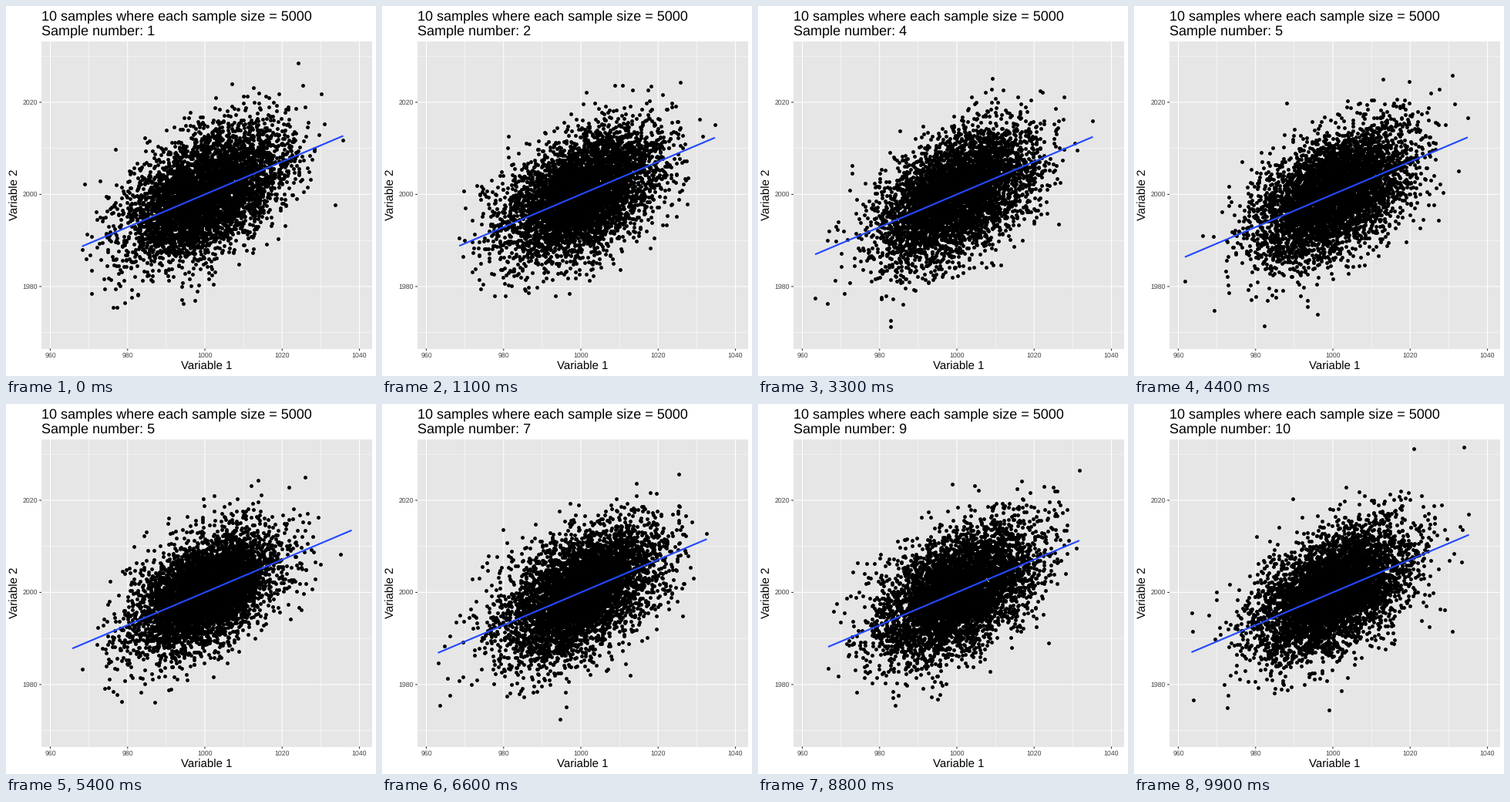
A matplotlib script that plays this animation: 480x480 px, repeating every 10 s.

```python
import numpy as np
import matplotlib.pyplot as plt
from matplotlib.animation import FuncAnimation
from matplotlib.patches import Rectangle

plt.rcParams.update({"font.family": "Liberation Sans", "text.hinting": "none"})

SIZE, DPI = 480, 80
PT = 72 / DPI                        # points per stage pixel
FRAMES, STEPS, N = 100, 11, 5000     # loop length, frames per sample, points
MX, MY, SDX, SDY, CORR = 1000, 2000, 10, 7.1, .5
LEFT, TOP, RIGHT, BOTTOM = 46, 46, 474.5, 444.5
BLUE, PANEL, TICK, TICK_TEXT = "#2449ff", "#e6e6e6", "#333333", "#444444"

# Smallest and largest x of each sample, relative to the mean
LOWS = -31.8, -31.5, -37.5, -36.7, -38.3, -33.9, -37.0, -35.5, -33.3, -36.6
HIGHS = 35.8, 34.7, 39.3, 35.2, 34.9, 38.3, 32.6, 36.1, 31.7, 35.2


def px(x):
    return 258 + 5.0125 * (x - MX)


def py(y):
    return 244.4 - 5.975 * (y - MY)


def on_stage(dx, dy):
    return np.stack([px(MX + dx), py(MY + dy)], axis=-1)


def make_sample(rng, low, high):
    """Correlated normal points, with the x tails stretched to low and high."""
    a, b = rng.standard_normal((2, N))
    x = SDX * a
    y = SDY * (CORR * a + np.sqrt(1 - CORR ** 2) * b)
    tail = 2.5 * SDX
    x = np.interp(x, [x.min(), -tail, tail, x.max()], [low, -tail, tail, high])
    return on_stage(x, y)


def make_fit(low, high):
    ends = np.array([low, high])
    return on_stage(ends, CORR * SDY / SDX * ends)


def tween(states, i):
    k, step = divmod(i, STEPS)
    u = step / STEPS
    after = states[min(k + 1, len(states) - 1)]
    return (1 - u) * states[k] + u * after


def label(x, y, s, size, **kw):
    return ax.text(x, y, s, fontsize=size * PT, va="baseline", **kw)


def rule(xs, ys, color, width):
    ax.plot(xs, ys, color=color, lw=width * PT, zorder=1, snap=False,
            solid_capstyle="butt")


def draw_grid():
    ax.add_patch(Rectangle((LEFT, TOP), RIGHT - LEFT, BOTTOM - TOP,
                           fc=PANEL, lw=0, zorder=0))
    for v in range(960, 1041, 10):
        x, major = px(v), v % 20 == 0
        rule([x, x], [TOP, BOTTOM], "white", 1.07 if major else .53)
        if major:
            rule([x, x], [BOTTOM, BOTTOM + 2.75], TICK, 1.07)
            label(x, 456, str(v), 8.8, ha="center", color=TICK_TEXT)
    for v in range(1970, 2031, 10):
        y, major = py(v), v % 20 == 0
        rule([LEFT, RIGHT], [y, y], "white", 1.07 if major else .53)
        if major:
            rule([LEFT - 2.75, LEFT], [y, y], TICK, 1.07)
            label(41, y + 3, str(v), 8.8, ha="right", color=TICK_TEXT)


fig = plt.figure(figsize=(SIZE / DPI, SIZE / DPI), dpi=DPI, facecolor="white")
ax = fig.add_axes([0, 0, 1, 1])
ax.set(xlim=(0, SIZE), ylim=(SIZE, 0))
ax.axis("off")

draw_grid()
label(46, 18, "10 samples where each sample size = 5000", 18)
title = label(46, 37, "", 18)
label(260, 472, "Variable 1", 15, ha="center")
label(16, 244.5, "Variable 2", 15, ha="center", rotation=90,
      rotation_mode="anchor")

rng = np.random.default_rng(12)
clouds = [make_sample(rng, *span) for span in zip(LOWS, HIGHS)]
fits = [make_fit(*span) for span in zip(LOWS, HIGHS)]
dots, = ax.plot([], [], "o", color="black", ms=4.9 * PT, mew=0, zorder=2)
line, = ax.plot([], [], color=BLUE, lw=2.13 * PT, zorder=3,
                solid_capstyle="butt")


def update(i):
    dots.set_data(*tween(clouds, i).T)
    line.set_data(*tween(fits, i).T)
    title.set_text(f"Sample number: {i // STEPS + 1}")
    return dots, line, title


anim = FuncAnimation(fig, update, frames=FRAMES, interval=100,
                     repeat=True, repeat_delay=0)
plt.show()
```
